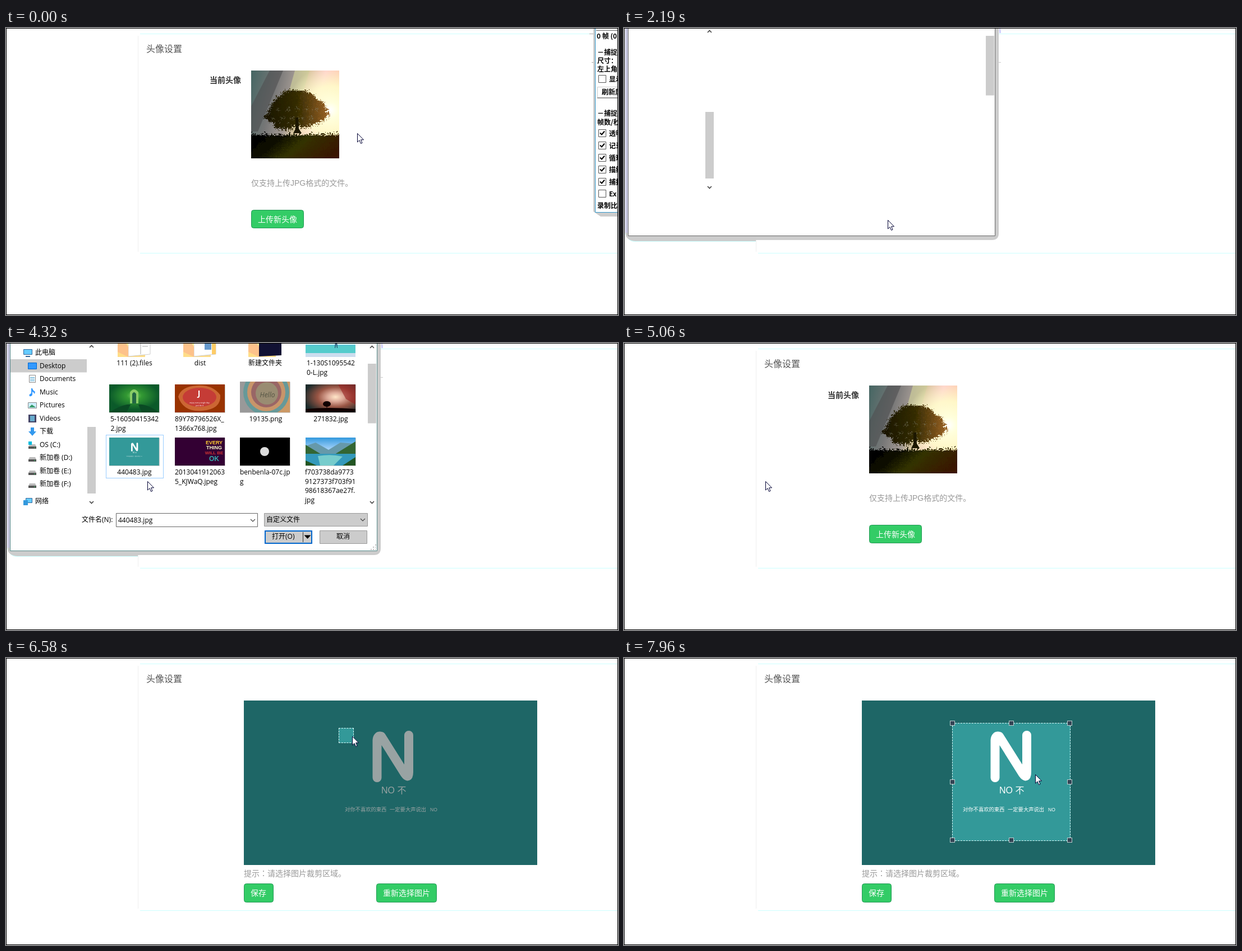
An HTML page that plays this animation: 1091 by 513 pixels, repeating every 8000 ms.

```html
<!DOCTYPE html>
<html lang="zh-CN">
<head>
<meta charset="utf-8">
<title>头像设置</title>
<style>
@property --n { syntax: "<integer>"; inherits: true; initial-value: 0 }
html, body { margin: 0; width: 100%; height: 100%; overflow: hidden; background: #fff }
#stage { position: absolute; left: 0; top: 0; width: 1091px; height: 513px; overflow: hidden }
#stage > svg { position: absolute; left: 0; top: 0 }
#edge { position: absolute; inset: 0; border: 1px solid #000 }
text { white-space: pre }
.page { font: 14px "Liberation Sans", "Noto Sans CJK SC", sans-serif }
.win { font: 12px "Open Sans", "Noto Sans CJK SC", sans-serif }
.rec, #count { font: bold 12px "Noto Sans CJK SC", sans-serif }
.slogan { font: bold 9px "Liberation Sans", sans-serif }
.colon { font-family: "Noto Sans CJK TC", sans-serif }
.title { font-size: 16px; fill: #555 }
.note { fill: #999 }
.btn rect { fill: #3c6; stroke: #295 }
.btn text { fill: #fff; font-weight: 500 }
.mid { text-anchor: middle }
.chev { fill: none; stroke: #444; stroke-width: 1.6 }

.before, .after, .image, .recorder, #count, #dialog, #hover, #bars, #side, #list, #frame, .picked, #field, .scroll, #sel, #sel i, #cursor {
  animation: 8s step-end infinite }

/* scenes */
.before { animation-name: before }
.after { animation-name: after }
.image { animation-name: image }
.recorder { animation-name: recorder }
#count { animation-name: recorder, count }
#bars { animation-name: bars }
#side { animation-name: side }
#list { animation-name: list }
#frame { animation-name: frame }
.picked { animation-name: picked }
#field { animation-name: field }
@keyframes before { 0% { opacity: 1 } 65.375%, 100% { opacity: 0 } }
@keyframes after { 0% { opacity: 0 } 65.375%, 100% { opacity: 1 } }
@keyframes image { 0% { opacity: 0 } 66.875%, 100% { opacity: 1 } }
@keyframes recorder { 0% { opacity: 1 } 22.125%, 100% { opacity: 0 } }
@keyframes bars { 0% { opacity: 0 } 27.3%, 100% { opacity: 1 } }
@keyframes side { 0% { opacity: 0 } 27.95%, 100% { opacity: 1 } }
@keyframes list { 0% { opacity: 0 } 28.6%, 100% { opacity: 1 } }
@keyframes frame { 0% { stroke: #666 } 28.6%, 100% { stroke: #588 } }
@keyframes picked { 0% { opacity: 0 } 51.25%, 100% { opacity: 1 } }
@keyframes field { 0% { stroke: #06c } 51.25%, 100% { stroke: #666 } }
@keyframes count {
  0% { --n: 0 }
  1.25% { --n: 0; animation-timing-function: steps(15, start) }
  11.95% { --n: 15 }
  12% { --n: 15; animation-timing-function: steps(14, start) }
  22%, 100% { --n: 29 }
}

/* file dialog */
#dialog { animation-name: dialog; transform-origin: 335px 40px }
@keyframes dialog {
  0% { opacity: 0; transform: scale(.94) }
  22.125% { opacity: 0; transform: scale(.94); animation-timing-function: steps(5, start) }
  25.875% { opacity: 1; transform: scale(1) }
  59.375% { opacity: 1; transform: scale(1); animation-timing-function: steps(5, start) }
  64.2%, 100% { opacity: 0; transform: scale(.94) }
}
.scroll { animation-name: scroll }
@keyframes scroll {
  0% { transform: translateY(0) }
  46.1% { transform: translateY(0); animation-timing-function: steps(2, start) }
  47.5%, 100% { transform: translateY(var(--d)) }
}
#hover { fill: #cff; animation-name: hover }
@keyframes hover {
  0% { opacity: 0; x: 412px; y: 237px; height: 78px }
  39.5% { opacity: 1; x: 412px; y: 237px; height: 78px }
  41% { opacity: 1; x: 412px; y: 137px; height: 99px }
  42.2% { opacity: 1; x: 295px; y: 137px; height: 99px }
  46.1% { opacity: 1; x: 295px; y: 237px; height: 94px }
  49% { opacity: 1; x: 178.5px; y: 236.5px; height: 77px; stroke: none; fill: #cff }
  51.25% { opacity: 1; x: 178.5px; y: 236.5px; height: 77px; stroke: #9cf; fill: #cff }
  53.9%, 100% { opacity: 1; x: 178.5px; y: 236.5px; height: 77px; stroke: #9cf; fill: #fff }
}

/* crop area */
#crop { position: absolute; left: 424px; top: 76px; width: 523px; height: 294px; overflow: hidden }
#sel { position: absolute; box-sizing: border-box; border: 1px dashed #dff;
  box-shadow: 0 0 0 600px rgba(0, 25, 25, .4); animation-name: sel }
#sel i { position: absolute; box-sizing: border-box; width: 9px; height: 9px; margin: -5px;
  border: 1px solid #bcc; background: #345; animation-name: handles }
@keyframes sel {
  0% { opacity: 0; left: 169px; top: 49px; width: 2px; height: 2px }
  82.25% { opacity: 1; left: 169px; top: 49px; width: 2px; height: 2px; animation-timing-function: steps(8, start) }
  87.7% { opacity: 1; width: 198px; height: 198px }
  88.3% { opacity: 1; width: 198px; height: 198px; animation-timing-function: steps(5, start) }
  91.9% { opacity: 1; width: 211px; height: 211px }
  96.5% { opacity: 1; left: 169px; top: 49px; width: 211px; height: 211px; animation-timing-function: steps(4, start) }
  99.5%, 100% { opacity: 1; left: 161px; top: 40px; width: 211px; height: 211px }
}
@keyframes handles { 0% { opacity: 0 } 93%, 100% { opacity: 1 } }

#cursor { animation-name: cursor }
@keyframes cursor {
  0% { transform: translate(626px, 188px) }
  1.25% { transform: translate(626px, 188px); animation-timing-function: steps(9, start) }
  7.5% { transform: translate(341px, 215px); animation-timing-function: steps(6, start) }
  11.9% { transform: translate(394px, 262px) }
  12% { transform: translate(394px, 262px); animation-timing-function: steps(11, start) }
  20% { transform: translate(470px, 341px) }
  22.1% { transform: translate(470px, 343px) }
  35.25% { transform: translate(470px, 343px); animation-timing-function: steps(5, start) }
  38.5% { transform: translate(554px, 300px); animation-timing-function: steps(6, start) }
  43.1% { transform: translate(365px, 194px) }
  46.1% { transform: translate(365px, 194px); animation-timing-function: steps(7, start) }
  51.2% { transform: translate(240px, 215px) }
  51.9% { transform: translate(240px, 215px); animation-timing-function: steps(4, start) }
  53.9% { transform: translate(252px, 247px) }
  69.375% { transform: translate(252px, 247px); animation-timing-function: steps(4, start) }
  72% { transform: translate(774px, 205px); animation-timing-function: steps(5, start) }
  75.5% { transform: translate(625px, 170px) }
  76.1% { transform: translate(625px, 170px); animation-timing-function: steps(5, start) }
  79.2% { transform: translate(592px, 127px) }
  79.75% { transform: translate(592px, 125px) }
  82.25% { transform: translate(592px, 125px); animation-timing-function: steps(8, start) }
  87.7% { transform: translate(793px, 243px) }
  88.3% { transform: translate(793px, 243px); animation-timing-function: steps(5, start) }
  91.9% { transform: translate(803px, 250px) }
  93% { transform: translate(803px, 250px); animation-timing-function: steps(4, start) }
  95.5% { transform: translate(741px, 217px) }
  96.5% { transform: translate(741px, 217px); animation-timing-function: steps(4, start) }
  99.5%, 100% { transform: translate(733px, 208px) }
}
#count { position: absolute; left: 1053px; top: 5px; line-height: 18px; white-space: pre }
#count::before { counter-reset: n var(--n); content: counter(n) }
</style>
</head>
<body>
<div id="stage">
<svg width="1091" height="513">
  <defs>
    <linearGradient id="dusk" y2=".25">
      <stop stop-color="#456663"/><stop offset=".3" stop-color="#777"/><stop offset=".5" stop-color="#a39a94"/>
      <stop offset=".62" stop-color="#d9c79f"/><stop offset=".8" stop-color="#fcc"/><stop offset="1" stop-color="#fdc9a8"/>
    </linearGradient>
    <radialGradient id="sun" cx=".9" cy=".45" r=".5">
      <stop stop-color="#fff"/><stop offset=".18" stop-color="#ffd"/><stop offset=".55" stop-color="#ffc" stop-opacity=".85"/><stop offset="1" stop-color="#ffc" stop-opacity="0"/>
    </radialGradient>
    <linearGradient id="soil" y2=".4"><stop stop-color="#000"/><stop offset=".3" stop-color="#0a0a00"/><stop offset=".55" stop-color="#330"/><stop offset="1" stop-color="#3a1400"/></linearGradient>
    <linearGradient id="leaf"><stop stop-color="#181400"/><stop offset=".5" stop-color="#332b00"/><stop offset="1" stop-color="#9a6226"/></linearGradient>
    <radialGradient id="wood" cy=".4"><stop stop-color="#7c6"/><stop offset=".3" stop-color="#393"/><stop offset="1" stop-color="#0b5a2a"/></radialGradient>
    <radialGradient id="glow" cx=".6" cy=".45" r=".65"><stop stop-color="#ffe6c8"/><stop offset=".25" stop-color="#da9"/><stop offset=".55" stop-color="#954"/><stop offset="1" stop-color="#1c2b2b"/></radialGradient>
    <linearGradient id="sky" x2="0" y2="1"><stop stop-color="#39d"/><stop offset=".5" stop-color="#bdf"/><stop offset="1" stop-color="#6bd"/></linearGradient>
    <filter id="rough"><feTurbulence baseFrequency=".25" numOctaves="2" seed="4"/><feDisplacementMap in="SourceGraphic" scale="13" xChannelSelector="R" yChannelSelector="G"/></filter>
    <clipPath id="view"><path d="M161 1H645V292H161z"/></clipPath>
    <clipPath id="photo"><path d="M437 76h157v157H437z"/></clipPath>
    <clipPath id="swirl"><path d="M417 141h89v55h-89z"/></clipPath>
    <g id="poster">
      <path fill="#399" d="M0 0h523v294H0z"/>
      <path fill="none" stroke="#fff" stroke-width="16" stroke-linecap="round" stroke-linejoin="round" d="M237.500 138V71Q238 62 245 64L287 131Q294 141 294 128V62"/>
      <g fill="#fff" class="page">
        <text x="245" y="166" font-size="16">NO 不</text>
        <g font-size="9.3"><text x="180" y="198">对你不喜欢的東西</text><text x="260" y="198">一定要大声说出</text><text x="332" y="198" font-size="8.500">NO</text></g>
      </g>
    </g>
    <g id="folder">
      <path fill="#fd8" d="M1 1H47V8L50 12V82H1z"/>
      <path fill="#fff" stroke="#ccc" d="M20 14 59 8V77L20 81z"/>
    </g>
    <g id="cover"><path fill="#fe9" d="M1 1 20 14V82L1 73z"/><path fill="#fdc28b" d="M1 32 20 64V82L1 73z"/></g>
    <g id="drive"><path fill="#bbb" d="M3 4H13L15 8H1z"/><path fill="#555" d="M1 8H15V12H1z"/><path fill="#3c6" d="M11 9.500h2v1h-2z"/></g>
    <g id="box"><path fill="#fff" stroke="#555" d="M.5 .5H13.500V13.500H.5z"/></g>
    <g id="check"><use href="#box"/><path fill="none" stroke="#000" stroke-width="2" d="M3 6.500 6 9.500 11 3.500"/></g>
  </defs>

  <!-- settings page -->
  <g class="page">
    <path stroke="#cff" d="M239 10.500H1090"/>
    <text class="title" x="250" y="43">头像设置</text>
    <g class="before">
      <path stroke="#eee" d="M235.500 14V400"/><path stroke="#cff" d="M239 402.500H1090"/>
      <text x="363" y="98" font-weight="bold" fill="#333">当前头像</text>
      <g clip-path="url(#photo)">
        <path fill="url(#dusk)" d="M437 76h157v157H437z"/>
        <path fill="#4f4f50" opacity=".6" d="M470 76H494L449 185H437V140z"/>
        <path fill="#cc9" opacity=".7" d="M515 76H541L530 112H505z"/>
        <path fill="url(#sun)" d="M437 76h157v157H437z"/>
        <path fill="url(#soil)" filter="url(#rough)" d="M430 187H600V245H430z"/>
        <path fill="url(#leaf)" filter="url(#rough)" d="M456 155Q466 146 468 136T484 118Q494 104 518 108Q543 108 551 124Q568 130 568 142Q578 154 562 160Q554 172 542 168Q532 182 515 170Q500 184 488 176Q472 182 474 164Q462 166 456 155z"/>
        <path stroke="#887" opacity=".6" stroke-width="3" stroke-dasharray="4 13" filter="url(#rough)" d="M470 158H550M482 168H545M480 142H556"/>
        <path fill="#1c1700" d="M516 160H521L522 180 527 188H512L516 180z"/>
      </g>
      <text class="note" x="437" y="282">仅支持上传JPG格式的文件。</text>
      <g class="btn"><rect x="437.500" y="325.500" width="93" height="32" rx="4"/><text x="449" y="347">上传新头像</text></g>
    </g>
    <g class="after">
      <path stroke="#eee" d="M235.500 14V448"/><path stroke="#cff" d="M239 451.500H1090"/>
      <text class="note" x="424" y="390">提示<tspan class="colon" lang="zh-TW">：</tspan>请选择图片裁剪区域。</text>
      <g class="btn"><rect x="424.500" y="403.500" width="52" height="33" rx="4"/><text x="436" y="425">保存</text></g>
      <g class="btn"><rect x="660.500" y="403.500" width="107" height="33" rx="4"/><text x="672" y="425">重新选择图片</text></g>
    </g>
    <use class="image" href="#poster" x="424" y="76"/>
  </g>

  <!-- capture tool -->
  <g class="rec recorder">
    <path fill="#ccc" d="M1047 0H1091V337H1060L1047 328z"/>
    <path fill="#fff" stroke="#39c" d="M1050.500 -1H1092V329.500H1050.500z"/>
    <path stroke="#aaa" d="M1040 10.500H1047M1044 61.500H1047"/>
    <path stroke="#666" d="M1052 4.500H1091"/>
    <text x="1054" y="48">－捕捉</text><text x="1054" y="63">尺寸：</text><text x="1054" y="78">左上角</text>
    <use href="#box" x="1056" y="84"/><text x="1075" y="96">显示</text>
    <path fill="#fff" stroke="#ccc" d="M1054.500 105.500H1095V124.500H1054.500z"/><path stroke="#555" d="M1054 125H1091"/>
    <text x="1062" y="119">刷新屏幕</text>
    <text x="1054" y="157">－捕捉</text><text x="1054" y="173">帧数/秒</text>
    <use href="#check" x="1056" y="181"/><text x="1075" y="193">透明</text>
    <use href="#check" x="1056" y="203"/><text x="1075" y="215">记录</text>
    <use href="#check" x="1056" y="225"/><text x="1075" y="237">循环</text>
    <use href="#check" x="1056" y="246"/><text x="1075" y="258">描绘</text>
    <use href="#check" x="1056" y="268"/><text x="1075" y="280">捕捉</text>
    <use href="#box" x="1056" y="289"/><text x="1075" y="301">Ex</text>
    <text x="1054" y="322">录制比</text>
  </g>

  <!-- file dialog -->
  <g id="dialog" class="win">
    <path fill="#cff" d="M2 360Q3 382 20 382H235V370H2z"/>
    <path fill="#ccc" d="M2 0H668V367Q668 379 656 379H235V381H20Q2 380 2 363z"/>
    <path fill="#c8c8e0" d="M2 0H7V366H2z"/>
    <path fill="#ccf" d="M669 0H671L672 9H669z"/><path stroke="#ccc" d="M668 61.500H672"/>
    <path id="frame" fill="#fff" d="M7.500 -5H661.500V371.500H7.500z"/>
    <g id="bars">
      <path fill="#ccc" d="M145 150h15v119h-15z"/>
      <path class="chev" d="M149 8 152.500 4.500 156 8M149 283 152.500 286.500 156 283"/>
      <path class="scroll" style="--d:23px" fill="#ccc" d="M645 14h15v106.500h-15z"/>
    </g>
    <g id="side">
      <path fill="#ccc" d="M8 29H144V52.500H8z"/>
      <path fill="#6cf" stroke="#369" d="M31.500 11.500h15v9h-15z"/><path stroke="#369" stroke-width="2" d="M35 24H43"/>
      <path fill="#39f" stroke="#06c" d="M39.500 35.500h15v11h-15z"/>
      <path fill="#fff" stroke="#888" d="M41.500 57.500h11v13h-11z"/><path stroke="#39c" d="M43 61.500h8M43 64.500h8M43 67.500h8"/>
      <path fill="#39f" d="M45 81h2q1 4 5 6-1 4-2 4 0-3-3-4v5q-1 4-5 3-2-3 3-5z"/>
      <path fill="#cef" stroke="#888" d="M39.500 106.500h15v10h-15z"/><path fill="#396" d="M41 115 46 110 53 115z"/>
      <path fill="#446" d="M40 128h14v14H40z"/><path fill="#6ac" d="M43 130h8v10h-8z"/>
      <path fill="#39e" d="M44 151h6v7h4L47 166 40 158h4z"/>
      <use href="#drive" x="39" y="177"/><path fill="#0bd" d="M40 176h6v6h-6z"/>
      <use href="#drive" x="39" y="200"/><use href="#drive" x="39" y="224"/><use href="#drive" x="39" y="247"/>
      <path fill="#6cf" stroke="#369" d="M35.500 277.500h11v8h-11z"/><path fill="#39d" d="M31 281h8v9h-8z"/>
      <text x="52" y="21">此电脑</text><text x="60" y="45">Desktop</text><text x="60" y="68">Documents</text>
      <text x="60" y="92">Music</text><text x="60" y="115">Pictures</text><text x="60" y="139">Videos</text>
      <text x="60" y="162">下载</text><text x="60" y="186">OS (C:)</text><text x="60" y="209">新加卷 (D:)</text>
      <text x="60" y="233">新加卷 (E:)</text><text x="60" y="256">新加卷 (F:)</text><text x="52" y="287">网络</text>
    </g>
    <g id="list">
      <path class="chev" d="M649 9 652.500 5.500 656 9M649 283 652.500 286.500 656 283"/>
      <g clip-path="url(#view)"><g class="scroll" style="--d:-72px">
        <rect id="hover" width="102"/>
        <use href="#folder" x="198" y="15"/><path fill="none" stroke="#aaa" d="M240 24V92M240 43l9 5-9 6zM243 66h12M243 72h12M243 78h10"/><use href="#cover" x="198" y="15"/>
        <use href="#folder" x="315" y="15"/><path fill="#fc6" d="M367 36h7v56h-7z"/><path fill="none" stroke="#39c" d="M354 40h12M354 45h12M354 50h10"/><path fill="#69c" d="M354 56h12v28h-12z"/><use href="#cover" x="315" y="15"/>
        <use href="#folder" x="431" y="15"/><path fill="#113" d="M450 28 491 23V94L450 96z"/><use href="#cover" x="431" y="15"/>
        <path fill="#6be" d="M534 41h89v56h-89z"/><path fill="#dff" d="M534 52Q555 46 580 53T623 50V57Q590 62 534 58zM534 69Q550 60 570 67T623 64V75H534z"/><path fill="#5cc" d="M534 76h89v15h-89z"/><path fill="#cde" d="M534 90h89v7h-89z"/>
        <path fill="#246" d="M587 62h3v8l1 11h-1l-1.500-8-1.500 8h-1l1-11z"/>
        <path fill="url(#wood)" d="M184 146h89v50h-89z"/><path fill="#8c6" d="M221 180V160Q228 150 236 160V180z"/><path fill="#264" d="M225 180V163Q228 157 232 163V180z"/><path fill="#0a4a24" d="M184 196Q210 180 222 182L215 196zM273 196Q250 180 236 182L242 196z"/>
        <path fill="#930" d="M301 146h89v50h-89z"/><path fill="#c63" d="M307 168Q312 150 340 148T382 165Q384 190 350 193T307 168z"/><ellipse cx="345" cy="169" rx="30" ry="17" fill="#c53c36"/>
        <g class="mid" fill="#fff"><text x="344" y="167" font-size="14" font-weight="bold">J</text><text x="345" y="180" font-size="3.500">enjoy every single day</text><text x="345" y="185" font-size="3.500">just do it</text></g>
        <g clip-path="url(#swirl)">
          <path fill="#c96" d="M417 141h89v55h-89z"/><path fill="#999" d="M417 141h36v55h-36z"/><circle cx="464" cy="160" r="41" fill="#699"/><circle cx="464" cy="160" r="34" fill="#c8956a"/><circle cx="464" cy="160" r="27" fill="#966"/><circle cx="465" cy="162" r="20" fill="#998c72"/>
          <text class="mid" x="466" y="169" font-size="12" font-style="italic" fill="#554">Hello</text>
        </g>
        <path fill="url(#glow)" d="M534 146h89v50h-89z"/><path fill="#922" opacity=".6" d="M592 146H623V182L606 172z"/><path fill="#100" d="M534 190Q575 186 623 190V196H534z"/><ellipse cx="572" cy="181" rx="7" ry="5" fill="#100"/><path stroke="#100" d="M572 180v8"/>
        <use href="#poster" transform="translate(184 241)scale(.17)"/>
        <path fill="#303" d="M301 241h89v50h-89z"/>
        <g class="mid slogan"><text x="371" y="253" fill="#fc3">EVERY</text><text x="371" y="262" fill="#ffc">THING</text><text x="371" y="271" font-size="8" fill="#c33">WILL BE</text><text x="371" y="283" font-size="12" fill="#3aa">OK</text></g>
        <path fill="#000" d="M417 241h89v50h-89z"/><circle cx="461" cy="266" r="8" fill="#ddd"/>
        <path fill="url(#sky)" d="M534 241h89v50h-89z"/><path fill="#69a" d="M534 256L552 250 575 263 596 250 623 252V272H534z"/><path fill="#363" d="M534 254L562 271H534zM623 248L586 271H623z"/><path fill="#39b" d="M534 270H623V291H534z"/><path fill="#7cc" d="M556 274Q580 270 600 275L584 291H560z"/><path fill="#252" d="M534 282L554 291H534zM623 276L600 291H623z"/>
        <path fill="none" stroke="#ccc" d="M184 196.500h89.500v-50M301 196.500h89.500v-50M417 196.500h89.500v-55M534 196.500h89.500v-50M184 291.500h89.500v-50M301 291.500h89.500v-50M417 291.500h89.500v-50M534 291.500h89.500v-50"/>
        <g class="mid">
          <text x="229" y="112">111 (2).files</text><text x="346" y="112">dist</text><text x="462" y="112">新建文件夹</text>
          <text x="229" y="212">5-16050415342</text><text x="200" y="229">2.jpg</text>
          <text x="463" y="212">19135.png</text><text x="579" y="212">271832.jpg</text>
          <text x="229" y="307">440483.jpg</text>
        </g>
        <text x="536" y="112">1-130S1095542</text><text x="536" y="129">0-L.jpg</text>
        <text x="301" y="212">89Y78796526X_</text><text x="301" y="229">1366x768.jpg</text>
        <text x="301" y="307">2013041912063</text><text x="301" y="324">5_KJWaQ.jpeg</text>
        <text x="417" y="307">benbenla-07c.jp</text><text x="417" y="324">g</text>
        <text x="533" y="307">f703738da9773</text><text x="533" y="324">9127373f703f91</text><text x="533" y="340">98618367ae27f.</text><text x="533" y="357">jpg</text>
      </g></g>
      <text x="135" y="320">文件名(N):</text>
      <path id="field" fill="#fff" d="M196.500 304.500H448.500V328.500H196.500z"/>
      <text class="picked" x="200" y="321">440483.jpg</text>
      <path fill="#ccc" stroke="#999" d="M460.500 304.500H644.500V327.500H460.500zM559.500 335.500H643.500V358.500H559.500z"/>
      <path class="chev" style="stroke-width:1.1" d="M436 315 440 319 444 315M632 314 636 318 640 314"/>
      <text x="464" y="320">自定义文件</text>
      <path fill="#ccc" stroke="#06c" stroke-width="2" d="M462 336H545V358H462z"/>
      <path stroke="#333" d="M529.500 338V356"/><path d="M531.500 343.500H543.500L537.500 350z"/>
      <text x="474" y="350">打开(O)</text><text class="mid" x="601" y="350">取消</text>
      <path stroke="#bbb" stroke-width="2" stroke-dasharray="2" d="M650 369H659M654 365H659M658 361H660"/>
    </g>
  </g>
</svg>
<div id="count"> 帧 (0</div>
<div id="crop"><div id="sel">
  <i style="left:0;top:0"></i><i style="left:50%;top:0"></i><i style="left:100%;top:0"></i>
  <i style="left:0;top:50%"></i><i style="left:100%;top:50%"></i>
  <i style="left:0;top:100%"></i><i style="left:50%;top:100%"></i><i style="left:100%;top:100%"></i>
</div></div>
<svg width="1091" height="513"><path id="cursor" fill="#fff" stroke="#003" d="M.5 .5V16L4 12.700 6.500 18.500 9 17.400 6.600 11.800H11.500z"/></svg>
<div id="edge"></div>
</div>
</body>
</html>
```
